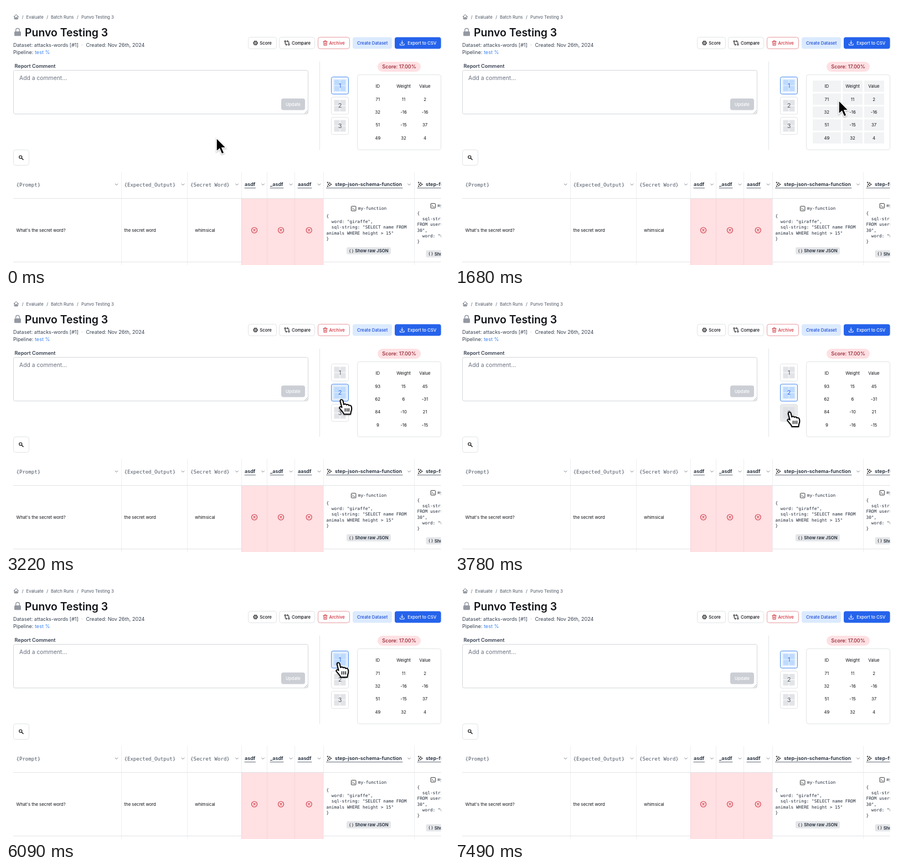
Recreate the animation shown at these times as an HTML page. Size 800 by 469 pixels, loop 7.56 s.

```html
<!DOCTYPE html>
<html lang="en">
<head>
<meta charset="utf-8">
<title>Batch run report</title>
<style>
html, body { margin: 0; width: 100%; height: 100%; overflow: hidden; background: #fff; }
svg { display: block; font-family: Inter, sans-serif; }
.mono { font-family: "DejaVu Sans Mono", monospace; white-space: pre; }
.ico { fill: none; stroke-linecap: round; stroke-linejoin: round; }
</style>
</head>
<body>
<svg id="stage" width="800" height="469" viewBox="0 0 800 469"></svg>
<script>
const LOOP = 7560, STEP = 70;
const XS = 7.77, SM = 9.06, MD = 10.35;
const INK = '#111318', GRAY = '#4b5563', LINE = '#e1e3e6', FAINT = '#edeef0';
const RED = '#d0303c', BLUE = '#2563eb', PINK = '#ffe0e3';
const stage = document.getElementById('stage');

const esc = s => String(s).replace(/&/g, '&amp;').replace(/</g, '&lt;').replace(/>/g, '&gt;');
const text = (x, y, s, size = XS, fill = INK, weight = 400, extra = '') =>
  `<text x="${x}" y="${y}" font-size="${size}" fill="${fill}" font-weight="${weight}" ${extra}>${esc(s)}</text>`;
const mid = (x, y, s, size, fill, weight, extra = '') =>
  text(x, y, s, size, fill, weight, 'text-anchor="middle" ' + extra);
const mono = (x, y, s, size = XS, fill = '#1f2937') => text(x, y, s, size, fill, 400, 'class="mono"');
const rect = (x, y, w, h, fill, stroke = 'none', r = 0, extra = '') =>
  `<rect x="${x}" y="${y}" width="${w}" height="${h}" rx="${r}" fill="${fill}" stroke="${stroke}" ${extra}/>`;
const icon = (d, stroke = INK, width = 1) =>
  `<path class="ico" d="${d}" stroke="${stroke}" stroke-width="${width}"/>`;
const chevron = x => icon(`M${x - 2.4} 322l2.4 2.4 2.4-2.4`, '#6b7280', .9);
const pickTop = i => 128.5 + i * 36.5;

function header() {
  const crumb = (x, s) => text(x, 22.8, s, XS, GRAY);
  return icon('M14.3 19.5l4-4 4 4M15.3 18.7v4.8h6v-4.8M17.3 23.3v-2.8h2v2.8', GRAY, .9) +
    crumb(28.7, '/') + crumb(36.5, 'Evaluate') + crumb(73.2, '/') + crumb(81, 'Batch Runs') +
    crumb(128, '/') + crumb(136, 'Punvo Testing 3') +
    rect(15, 46, 12, 8.3, '#9499a3', 'none', 1.5) + icon('M17.7 46v-2.3a3.3 3.3 0 0 1 6.6 0v2.3', '#9499a3', 1.5) +
    text(34, 54.7, 'Punvo Testing 3', 19.4, INK, 600) +
    text(13, 74.3, 'Dataset: attacks-words [#1]', SM, '#374151') +
    text(136, 74.3, '·', SM, '#9ca3af') +
    text(144.5, 74.3, 'Created: Nov 26th, 2024', SM, '#374151') +
    text(13, 87.3, 'Pipeline:', SM, '#374151') + text(52, 87.3, 'test %', SM, '#3b82f6');
}

function toolbar() {
  const button = (x, w, tx, s, fill, stroke, color) =>
    rect(x, 56.5, w, 21, fill, stroke, 4) + text(tx, 69.8, s, XS, color, 500);
  const gear = '<circle cx="450.5" cy="67" r="3.4" fill="none" stroke="#222" stroke-width="1.7" stroke-dasharray="1.8 .87"/>' +
    '<circle cx="450.5" cy="67" r="2.8" fill="#fff" stroke="#222" stroke-width=".9"/>' +
    '<circle cx="450.5" cy="67" r="1.1" fill="#fff" stroke="#222" stroke-width=".8"/>';
  return button(437.5, 51, 458.3, 'Score', '#fff', LINE, INK) + gear +
    button(493.5, 64, 516, 'Compare', '#fff', LINE, INK) +
    icon('M504.2 65.5v3q0 1.5 1.5 1.5h1.5M505.8 68.5l1.5 1.5-1.5 1.5M510.8 68v-2.6q0-1.5-1.5-1.5h-1.8M508.8 62.4l-1.5 1.5 1.5 1.5') +
    '<circle cx="504.2" cy="64" r="1.3" fill="none" stroke="#111"/><circle cx="510.8" cy="69.8" r="1.3" fill="none" stroke="#111"/>' +
    button(563.5, 57, 583.5, 'Archive', '#fff', '#e79aa0', RED) +
    icon('M572.8 64.4h7.4M575 64.2v-1.3h3v1.3M573.6 64.6l.4 6.7h5l.4-6.7M575.6 66.5v3M577.4 66.5v3', RED, .9) +
    button(626, 71, 634, 'Create Dataset', '#dbeafe', 'none', '#1d4ed8') +
    button(702, 83.6, 725.3, 'Export to CSV', BLUE, 'none', '#fff') +
    icon('M715.3 63v5M713.2 66.2l2.1 2.1 2.1-2.1M711.5 68.5v2.3h7.6v-2.3', '#fff');
}

function comment() {
  return text(15.5, 112.3, 'Report Comment', SM, '#374151', 600) +
    rect(13.5, 116.5, 532, 79, '#fff', '#d3d6da', 3) +
    text(24, 133.8, 'Add a comment…', MD, '#6b7280') +
    rect(497, 167.5, 43, 21, '#cbced4', 'none', 4) + mid(518.5, 180.8, 'Update', XS, '#fff', 500) +
    icon('M539.5 194.5l5-5M542.5 194.5l2-2', '#8a8f98', .7) +
    icon('M566.5 101V260', LINE) +
    rect(13.5, 260.5, 28, 28, '#fff', LINE, 4) +
    '<circle cx="26.3" cy="273.5" r="2.5" fill="none" stroke="#111" stroke-width="1.2"/>' + icon('M28.3 275.5l2.8 2.8', INK, 1.4);
}

function score() {
  let out = rect(671, 101, 78, 18, PINK, 'none', 9) + mid(710, 113.3, 'Score: 17.00%', SM, '#8f1d2c', 500) +
    rect(634.5, 124.5, 151, 136, '#fff', LINE, 4) + '<g id="cells">';
  for (let r = 0; r < 5; r++)
    for (const [x, w] of [[646, 51], [700, 36], [739, 36]])
      out += rect(x, 135 + r * 23.4, w, 20.5, '#f2f3f4', 'none', 1);
  out += '</g>';
  for (let r = 0; r < 5; r++)
    [671.3, 718, 756.5].forEach((x, c) => out += mid(x, 148.1 + r * 23.4, ['ID', 'Weight', 'Value'][c], XS, INK, 400, r ? 'data-cell' : ''));
  for (let i = 0; i < 3; i++) {
    const y = pickTop(i);
    out += `<g class="pick">` + rect(587.5, y, 31, 31, '#fff', LINE, 3);
    for (const dx of [5, 16]) for (const dy of [5, 16]) out += rect(587.5 + dx, y + dy, 10, 10, '#e3e4e7');
    out += mid(603.2, y + 19.3, i + 1, MD, GRAY, 400) + '</g>';
  }
  return out;
}

function fnCell(x, y, dx, lines) {
  const cx = x + dx;
  let out = rect(cx, y - 4.2, 8.4, 8.4, 'none', '#222', 1, 'stroke-width=".9"') +
    icon(`M${cx + 2} ${y - 1.6}l1.6 1.6-1.6 1.6M${cx + 4.6} ${y + 1.9}h1.8`, '#222', .8) +
    mono(cx + 12.3, y + 2.6, 'my-function');
  lines.forEach((s, i) => out += mono(x, y + 15.7 + i * 10.35, s));
  const by = y + 18.3 + lines.length * 10.35;
  return out + rect(cx - 8.5, by, 80, 13, '#e4e6e9', 'none', 3) +
    text(cx - 4, by + 9.1, '{ }', 7, '#222', 500) + text(cx + 6.8, by + 9.3, 'Show raw JSON', XS, '#1f2937', 600);
}

function grid() {
  const name = (x, s, x0, x1) => text(x, 326.3, s, SM, '#1f2937', 600) + icon(`M${x0} 329.6H${x1}`, '#4b5563', .9);
  const sparkle = x => icon(`M${x} 319.6l1 2.4 2.6 1-2.6 1-1 2.4-1-2.4-2.6-1 2.6-1zM${x - 3.6} 318.6v2M${x - 4.6} 319.6h2M${x - 3.6} 325.4v2M${x - 4.6} 326.4h2`, '#222', .9);
  let out = rect(425.5, 348.5, 148.5, 121, PINK);
  for (const x of [208.5, 327.5, 425.5, 471.5, 521.5, 573.5, 737.5]) {
    out += icon(`M${x} 301V348`, FAINT);
    out += icon(`M${x} 349V469`, x > 425 && x < 573 ? '#f5d3d8' : FAINT);
  }
  out += icon('M13 348.5H786M13 463.5H425M574 463.5H786', LINE) +
    mono(18.5, 326.5, '{Prompt}', SM, GRAY) + mono(213.5, 326.5, '{Expected_Output}', SM, GRAY) +
    mono(333, 326.5, '{Secret Word}', SM, GRAY) +
    name(431, 'asdf', 431, 450.5) + name(477, '_asdf', 477, 501) + name(527, 'aasdf', 527, 552) +
    sparkle(584.6) + name(594, 'step-json-schema-function', 578.5, 716) +
    sparkle(748.8) + name(758, 'step-function', 743, 820) +
    [199.5, 319.5, 417, 464, 514.5, 565.5, 728].map(chevron).join('') +
    text(18.5, 408.6, "What's the secret word?") + text(213.5, 408.6, 'the secret word') + text(341.3, 408.6, 'whimsical');
  for (const x of [448.5, 496.5, 547.2])
    out += `<circle cx="${x}" cy="406" r="5" fill="none" stroke="${RED}" stroke-width="1.1"/>` +
      icon(`M${x - 1.6} 404.4l3.2 3.2m0-3.2l-3.2 3.2`, RED, 1.1);
  out += fnCell(578.5, 366.8, 45, ['{', '  word: "giraffe",', '  sql-string: "SELECT name FROM', 'animals WHERE height > 15"', '}']) +
    fnCell(742.5, 361.8, 24.5, ['{', '  sql-string: "SELECT', 'FROM users WHERE', '30",', '  word: "whale"', '}']);
  return `<g clip-path="url(#view)">${out}</g>`;
}

const pointers = `<g id="cursor" style="filter:drop-shadow(0 1px 1px #0005)">
  <path id="arrow" d="M0 0V24.5L5.6 19.4 9.6 29 14 27.2 10 17.8H17.5Z" fill="#000" stroke="#fff" stroke-width="1.5"/>
  <g id="hand" stroke="#000" stroke-width="2" stroke-linejoin="round" transform="translate(-.7 1.6) scale(.97 .94)">
    <path d="M-2.6 2C-3-1.6 1.6-1.9 2.3 1L4 8.5C5 6.8 8.3 7 8.8 9 10.3 7.6 13 8.3 13.4 10.3 15 9.4 17.6 10.3 18 12.5 19 16 18.6 19 17.4 21.5L16.5 27H4.2C3.6 23.5-1 19.5-3.8 15.6-4.8 13.6-2.6 11.7-.6 13.1L.4 14Z" fill="#fff"/>
    <path d="M6.5 15.5v6.5M10 15.5v6.5M13.5 15.5v6.5" fill="none" stroke-width="1.5"/>
  </g></g>`;

stage.innerHTML = '<clipPath id="view"><path d="M13 290H785.5V469H13Z"/></clipPath>' +
  header() + toolbar() + comment() + score() + grid() + pointers;

const $ = id => document.getElementById(id);
const cells = $('cells'), cursor = $('cursor'), arrow = $('arrow'), hand = $('hand');
const values = stage.querySelectorAll('[data-cell]'), picks = stage.querySelectorAll('.pick');

const DATA = [
  [71, 11, 2, 32, -16, -16, 51, -15, 37, 49, 32, 4],
  [93, 15, 45, 62, 6, -31, 84, -10, 21, 9, -16, -15],
  [8, -35, 35, 30, -19, 32, 23, 26, -22, 17, 11, -6]
];
const CLICKS = [[2800, 1], [4200, 2], [6020, 0]];
// Cursor moves: start, end, x, y
const MOVES = [[0, 420, 402, 233], [840, 1680, 693, 171], [1680, 2380, 608, 179],
  [3010, 3640, 605, 215], [4970, 5670, 601, 149], [6720, 7140, 480, 230]];

function cursorAt(t) {
  let x = 380, y = 239;
  for (const [a, b, tx, ty] of MOVES) {
    const p = Math.min(1, Math.max(0, (t - a) / (b - a))) ** .8, e = p * p * (3 - 2 * p);
    x += (tx - x) * e;
    y += (ty - y) * e;
  }
  return [x, y];
}

function draw(t) {
  const [x, y] = cursorAt(t), [hx, hy] = cursorAt(Math.max(0, t - 140)); // hover styles lag slightly
  const onPick = x > 587 && x < 620 && y > 128 && y < 234;
  const press = CLICKS.some(([at]) => Math.abs(t - at) < 60) ? .92 : 1;
  cursor.setAttribute('transform', `translate(${x} ${y}) scale(${press})`);
  cursor.setAttribute('opacity', Math.min(1, Math.max(0, (7490 - t) / 210)));
  arrow.style.display = onPick ? 'none' : '';
  hand.style.display = onPick ? '' : 'none';
  cells.style.display = hx > 634 && hy > 124 && hy < 261 ? '' : 'none';

  let active = 0;
  for (const [at, i] of CLICKS) if (t >= at) active = i;
  values.forEach((v, i) => v.textContent = DATA[active][i]);
  picks.forEach((g, i) => {
    const on = i === active, top = pickTop(i);
    const over = hx > 587 && hx < 619 && hy > top && hy < top + 31;
    const [box, ...quads] = g.querySelectorAll('rect');
    box.setAttribute('fill', on ? (over ? '#e2edfb' : '#eff6ff') : over ? '#e9eaec' : '#fff');
    box.setAttribute('stroke', on ? '#4a8df0' : LINE);
    quads.forEach(q => q.setAttribute('fill', on ? '#bfdbfe' : over ? '#dfe0e3' : '#e3e4e7'));
    g.querySelector('text').setAttribute('fill', on ? BLUE : GRAY);
  });
}

const start = performance.now();
function frame() {
  const t = (performance.now() - start) % LOOP;
  draw(t - t % STEP);
  requestAnimationFrame(frame);
}
frame();
</script>
</body>
</html>
```
